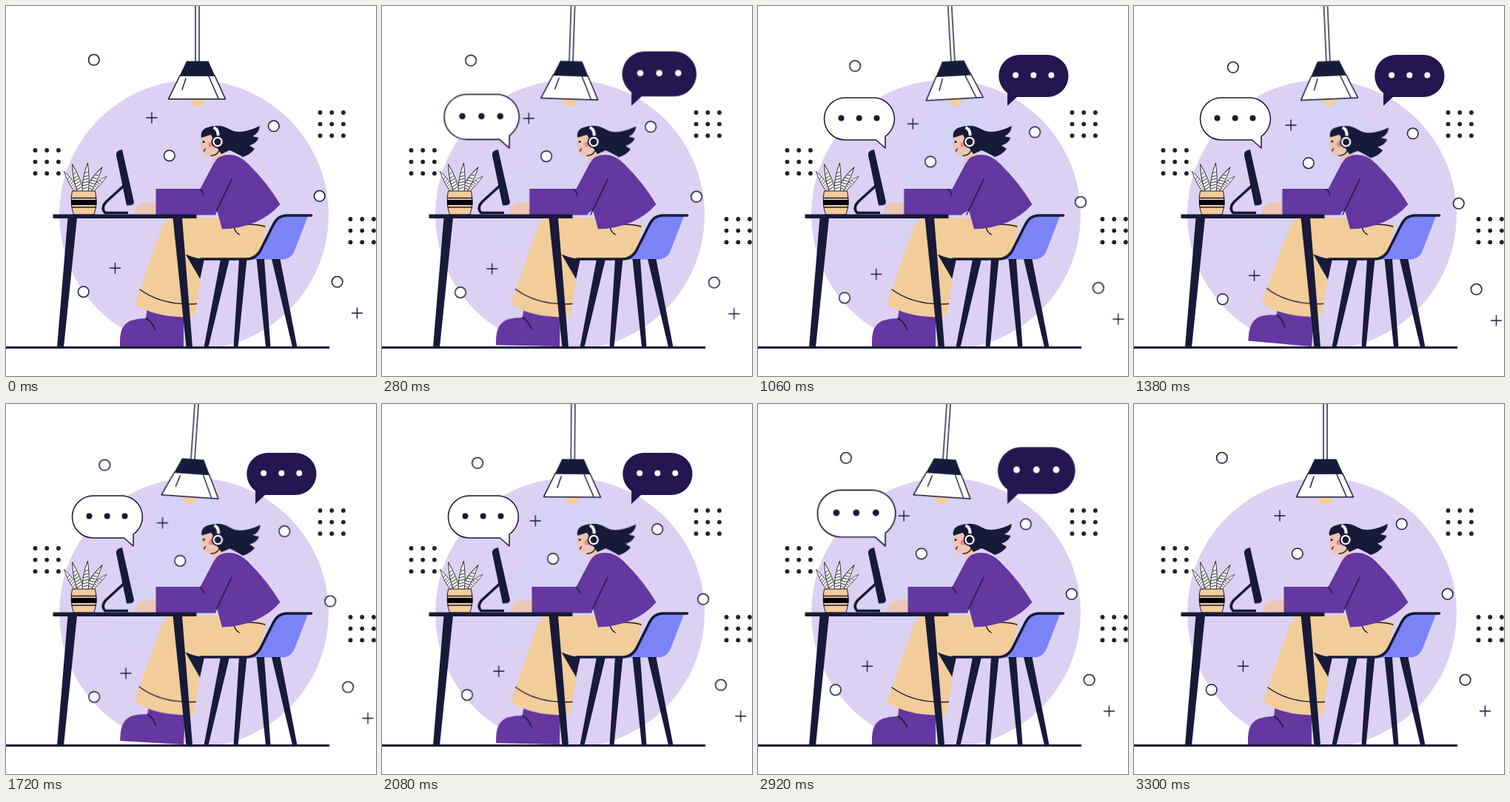
Write an HTML page that moves like this. It is 500 px wide and 500 px high and loops after 3600 ms.

```html
<!DOCTYPE html>
<html lang="en">
<head>
<meta charset="utf-8">
<title>Desk call</title>
<style>
  html, body { margin: 0; width: 100%; height: 100%; overflow: hidden; background: #fff; }
  svg { display: block; width: 100vw; height: 100vh; }
  :root { --navy: #171a38; --purple: #6437a1; --sand: #f2cd9a; --skin: #edc5b4; --sine: cubic-bezier(.364, 0, .636, 1); }
  .navy { fill: var(--navy); }
  .purple { fill: var(--purple); }
  .sand { fill: var(--sand); }
  .skin { fill: var(--skin); }
  .white { fill: #fff; }
  .line { fill: none; stroke: var(--navy); stroke-width: 1.4; stroke-linecap: round; stroke-linejoin: round; }
  .edge { stroke: var(--navy); stroke-width: 1.5; stroke-linejoin: round; }

  .move { animation: 3600ms var(--sine) infinite; }
  .float { animation-name: float; }
  .swing { animation-name: swing; transform-origin: 258.5px -13px; }
  .glow { animation-name: glow; }
  .pop { animation-name: pop; }
  .pop.left { transform-origin: 172px 192px; }
  .pop.right { transform-origin: 337px 135px; }
  .arm { animation-name: reach; }
  .head { --a: 2.6deg; animation-name: tap; transform-origin: 280px 200px; }
  .leg { --a: 1.15deg; animation-name: tap; transform-origin: 265px 300px; }
  .shoe { --a: 6deg; animation-name: tap; transform-origin: 241px 460px; }

  @keyframes float {
    0%, 83.333%, 100% { transform: none; }
    41.667% { transform: translate(15.3px, 10.2px); }
  }
  @keyframes swing {
    0% { transform: rotate(0deg); }
    16.667%, 50% { transform: rotate(4.3deg); }
    33.333%, 66.667% { transform: rotate(-4.3deg); }
    83.333% { transform: rotate(4.3deg); animation-timing-function: cubic-bezier(.47, 0, .745, .715); }
    91.667%, 100% { transform: rotate(0deg); }
  }
  @keyframes tap {
    0%, 4.167%, 29.167%, 54.167%, 79.167%, 100% { transform: rotate(0deg); }
    16.667%, 41.667%, 66.667% { transform: rotate(var(--a)); }
  }
  @keyframes reach {
    0%, 45%, 100% { transform: none; }
    14%, 30% { transform: translateX(-5.3px); }
  }
  @keyframes pop {
    0% { transform: scale(0); }
    9.2% { transform: scale(1.13); }
    14%, 75.6% { transform: scale(1); }
    80.4% { transform: scale(1.13); }
    89.5%, 100% { transform: scale(0); }
  }
  @keyframes glow {
    0%, 89.5%, 100% { opacity: 0; }
    14%, 75.6% { opacity: 1; }
  }
</style>
</head>
<body>
<svg viewBox="0 0 500 500">
  <defs>
    <linearGradient id="beam" x2="0" y2="1">
      <stop offset="0" stop-color="#cbd2ff" stop-opacity=".4"/>
      <stop offset="1" stop-color="#cbd2ff" stop-opacity=".25"/>
    </linearGradient>
    <g id="leaf">
      <path class="white" d="M-4 0Q-6-18 0-39Q5-17 4 0Z" stroke="#222" stroke-width=".9"/>
      <path d="M-4-4L3-6M-4-8L3-10M-4-12L3-14M-4-16L2.500-18M-3.500-20L2-22M-2.500-25L1.500-27" stroke="#222" stroke-width=".9"/>
    </g>
    <circle id="ring" r="7.300" class="white edge"/>
    <path id="plus" class="line" d="M-7 0H7M0-7V7"/>
    <g id="dots" fill="#20202a"></g>
  </defs>

  <circle cx="254" cy="282" r="182" fill="#dcd1f3"/>
  <g class="move glow">
    <path class="move swing" d="M222 126H295L366 330H151Z" fill="url(#beam)"/>
  </g>
  <use href="#dots" x="39.500" y="195"/>
  <use href="#dots" x="424.500" y="144"/>
  <use href="#dots" x="465.500" y="288"/>

  <!-- lamp -->
  <g class="move swing">
    <circle class="sand" cx="258.500" cy="126" r="10"/>
    <path class="line" d="M256-30V75M261-30V75"/>
    <path class="white edge" d="M235 94H282L296.500 125.700H219.500Z"/>
    <path class="line" d="M243 98L238 113M274 95L287 125"/>
    <path class="navy" d="M244 74.500H273.500L282.500 94.500H234.500Z"/>
  </g>

  <!-- chair -->
  <path fill="#7b83f7" d="M376 284H408L391 328Q386 342.500 373 342.500H330Q342 338 347 327L361 298Q366 286 376 284Z"/>
  <path class="navy" d="M290 342H302L273.500 461H267.500ZM315 342H325.500L313.500 461H307.500ZM338.500 342H349L357.500 461H351ZM359 342H370.500L393.500 461H387ZM240 334L268 342L262 370Z"/>

  <!-- leg and shoe -->
  <g class="move shoe">
    <path class="purple" d="M154 460V452Q154 431 169 425Q179 422 189 422L191 406L240 412V460Z"/>
    <path class="line" d="M189 422Q197 426 201.500 437"/>
  </g>
  <g class="move leg">
    <path class="sand" d="M226 286Q214 288 209 303L174 403Q206 423 254.500 420L263 370L243 336L262 300Z"/>
    <path class="line" d="M181 383Q210 405 257.500 402.500"/>
  </g>
  <path class="sand" d="M222 287L292 286L352 295Q349 315 343 330Q337 341 326 342H268Q254 341 242 335L226 320Z"/>
  <path fill="none" stroke="#171a38" stroke-width="3.600" stroke-linecap="round" d="M412.500 283H380Q367 283 361 296L346 326Q339 342 325 342H263"/>
  <path class="line" d="M308 299Q310 306 315.500 309M325 295Q340 295 350 298"/>

  <!-- head -->
  <g class="move head">
    <path class="skin" d="M266 172Q262 183 264 192Q265 202 273 203L280 202L278 210L297 205L294 175Z"/>
    <path class="navy" d="M264 178Q262 168 271 164.500Q288 158 303 167Q316 175 343 162Q342 172 333 176L341.500 178Q338 186 329 188.500L336 193Q330 201 320 204Q308 197 302 195L291 200L279 183Q280 176 276 174Q271 176 264 178Z"/>
    <circle cx="277" cy="187" r="3.400" fill="#e58b76"/>
    <circle class="navy" cx="267" cy="183.500" r="1.500"/>
    <path class="line" d="M267.500 196Q269 195.500 269 193M290 191Q287 202 277 202.500"/>
    <path d="M280.500 164Q287.500 167 286.500 177" fill="none" stroke="#fff" stroke-width="4"/>
    <circle class="navy" cx="286" cy="183.500" r="8.500"/>
    <circle cx="286" cy="183.500" r="5.600" fill="none" stroke="#fff" stroke-width="2.200"/>
  </g>

  <!-- body -->
  <path class="purple" d="M262 248L281 212Q287 201 301 201Q316 201 328 214Q354 240 370.500 268Q342 300 292 301.500L285 276L276 281Z"/>
  <g class="move arm">
    <path class="skin" d="M174.500 281Q175 266 189 265.500H205V281.500Z"/>
    <path class="purple" d="M202.500 247H265L292 254L281 282.500H202.500Z"/>
    <path class="line" d="M262 247.500Q266 250 267 256"/>
  </g>
  <path class="line" d="M305 234L282 282"/>

  <!-- desk -->
  <path class="navy" d="M149 202Q148 195 157 194L173 265Q173 270 163 269.500Z"/>
  <path d="M159 243L135 265Q128 273 134 279.500H165" fill="none" stroke="#171a38" stroke-width="3.600"/>
  <g>
    <use href="#leaf" transform="translate(97 251) rotate(-34) scale(.85)"/>
    <use href="#leaf" transform="translate(113 251) rotate(48) scale(.8)"/>
    <use href="#leaf" transform="translate(101 251) rotate(-17)"/>
    <use href="#leaf" transform="translate(110 251) rotate(31)"/>
    <use href="#leaf" transform="translate(107 251) rotate(5)"/>
    <path class="sand" d="M89.500 250H120.500Q124 266 119 282H91.500Q86 266 89.500 250Z" stroke="#171a38"/>
    <path d="M88 262H122.500V269H88Z"/>
    <path class="line" stroke-width="1" d="M88.500 259.500H122M89 272H121.500"/>
  </g>
  <path class="navy" d="M63.500 281.500H257.500V287H63.500ZM83.500 286H96L78 461H69ZM225.500 286H238L252 461H243.500Z"/>
  <path class="navy" d="M0 460H437V463H0Z"/>

  <!-- drifting marks -->
  <g class="move float">
    <use href="#ring" x="118.800" y="72.800"/>
    <use href="#ring" x="361.800" y="162.300"/>
    <use href="#ring" x="220.800" y="202.200"/>
    <use href="#ring" x="423.700" y="256.800"/>
    <use href="#ring" x="104.700" y="386.200"/>
    <use href="#ring" x="447.600" y="372.800"/>
    <use href="#plus" x="197" y="151"/>
    <use href="#plus" x="147.500" y="354.300"/>
    <use href="#plus" x="474.500" y="415"/>
  </g>

  <!-- speech bubbles -->
  <g class="move pop left">
    <path class="white edge" d="M118 124H155.500A28.500 28.500 0 0 1 172 176V192L159.500 181H118A28.500 28.500 0 0 1 118 124Z"/>
    <g class="navy"><circle cx="112.500" cy="151.500" r="4"/><circle cx="136.700" cy="151.500" r="4"/><circle cx="160.500" cy="151.500" r="4"/></g>
  </g>
  <g class="move pop right">
    <path fill="#241651" d="M353.500 66H391A28.500 28.500 0 0 1 391 123H350L337 135V117.500A28.500 28.500 0 0 1 353.500 66Z"/>
    <g class="white"><circle cx="348.200" cy="93.500" r="4"/><circle cx="372.300" cy="93.500" r="4"/><circle cx="396.300" cy="93.500" r="4"/></g>
  </g>
</svg>
<script>
  const dots = document.getElementById('dots');
  for (let i = 0; i < 9; i++) {
    const dot = document.createElementNS(dots.namespaceURI, 'circle');
    dot.setAttribute('cx', (i % 3) * 15.7);
    dot.setAttribute('cy', Math.floor(i / 3) * 15.6);
    dot.setAttribute('r', 2.9);
    dots.append(dot);
  }
</script>
</body>
</html>
```
